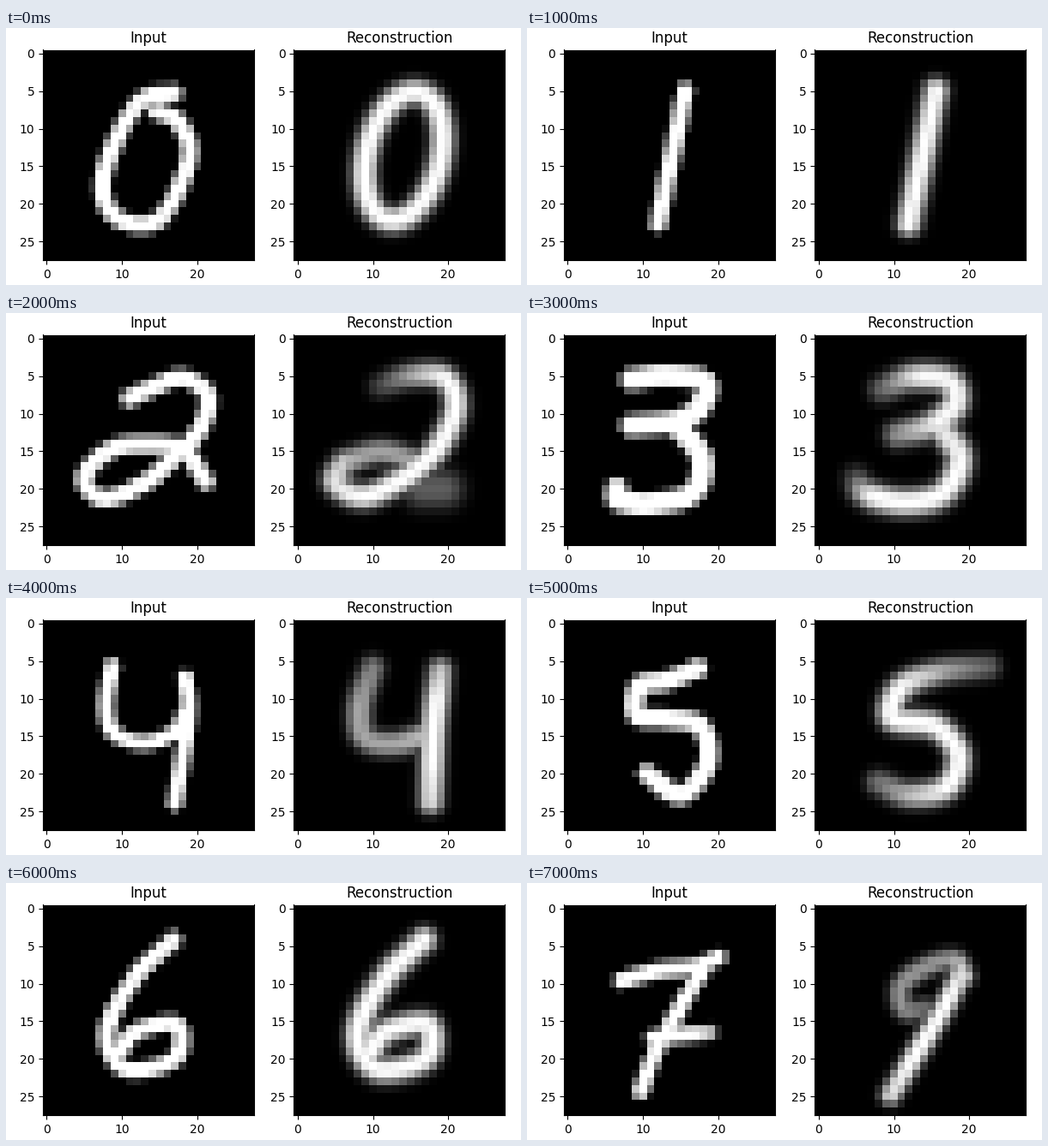
Animation of 600 by 300 pixels, one loop 8 s. Source, as a matplotlib script:

```python
import numpy as np
import matplotlib.pyplot as plt
from matplotlib.animation import FuncAnimation

SIZE = 28
GX, GY = np.meshgrid(np.arange(SIZE), np.arange(SIZE))


def stroke(*points, fade=(1, 1, 1)):
    """Catmull-Rom curve; fade is the brightness at start, middle and end."""
    p = np.array(points, float)
    p = np.vstack([2 * p[0] - p[1], p, 2 * p[-1] - p[-2]])
    t = np.linspace(0, 1, 24)[:, None]
    xy = np.vstack([
        b + 0.5 * t * (c - a + t * (2 * a - 5 * b + 4 * c - d
                                    + t * (3 * (b - c) + d - a)))
        for a, b, c, d in zip(p, p[1:], p[2:], p[3:])])
    start, middle, end = fade
    u = np.linspace(0, 1, len(xy))
    glow = np.interp(u, [0, 0.25, 0.75, 1], [start, middle, middle, end])
    return np.column_stack([xy, glow])


def oval(cx, cy, rx, ry, lean):
    """Closed ellipse slanted to the right."""
    a = np.linspace(0, 2 * np.pi, 120)
    x = cx + rx * np.cos(a) - lean * ry * np.sin(a)
    y = cy + ry * np.sin(a)
    return np.column_stack([x, y, np.ones_like(a)])


def paint(strokes, profile):
    s = np.vstack(strokes)
    dist = np.hypot(GX[..., None] - s[:, 0], GY[..., None] - s[:, 1])
    return (s[:, 2] * profile(dist)).max(axis=-1)


def pen(*strokes, r=1.1):
    """Crisp handwriting with a nearly hard edge."""
    return paint(strokes, lambda d: np.clip(r + 0.5 - d, 0, 1))


def blur(*strokes, w=1.7, p=2.5):
    """Soft strokes, as a decoder returns them."""
    return paint(strokes, lambda d: np.exp(-(d / w) ** p))


def zero():
    ring = stroke((16.9, 5.3), (13, 6), (9.7, 10.5), (7.4, 17.5), (9.5, 22),
                  (15, 22), (18.9, 14), (17.5, 9.2), (14.6, 7.7))
    return pen(ring), blur(oval(14.1, 13.7, 5, 8.5, 0.17))


def one():
    bar = stroke((15.6, 5), (12, 22.6))
    return pen(bar), blur(bar)


def two():
    ink = stroke((11, 8), (14, 6.6), (18, 5.3), (21.4, 7.7), (20.2, 12.3),
                 (16.8, 16), (12.7, 19.4), (7.5, 21.3), (5, 18.5),
                 (8.5, 14.8), (13, 14.1), (18, 14.8), (21.1, 19))
    body = stroke((11, 6.4), (15, 5), (19.5, 5.3), (21, 9), (19, 14),
                  (15, 18), (9, 21), (5, 19.2), (6.2, 16.5),
                  fade=(0.25, 0.95, 0.75))
    bridge = stroke((6.2, 16.5), (11, 15.1), (15.5, 16.3),
                    fade=(0.7, 0.6, 0.6))
    haze = stroke((16.5, 20), (19.5, 20), fade=(0.35, 0.35, 0.35))
    return pen(ink, r=1.15), np.maximum(blur(body, bridge), blur(haze, w=2.6))


def three():
    top = stroke((8.5, 5.5), (13, 5), (18.2, 5.8), (17.6, 9), (14.5, 11),
                 (8.5, 11.6))
    bowl = stroke((14.8, 12), (17.8, 16), (16.5, 20.6), (11, 22),
                  (6.8, 21.5), (6.5, 20))
    soft_top = stroke((8.5, 6.8), (12.5, 5.2), (17.3, 5.7), (18.2, 8.7),
                      (15, 11.5), (10.5, 12.8), fade=(0.35, 0.88, 0.5))
    soft_bowl = stroke((16.3, 12), (18.8, 16), (16.5, 20.6), (11.5, 21.8),
                       (6.5, 20.7), (5, 18.7), fade=(0.8, 0.9, 0.25))
    return pen(top, bowl, r=1.45), blur(soft_top, soft_bowl, w=1.85)


def four():
    bowl = stroke((8.7, 5.7), (7.9, 11), (9, 14.6), (13, 15.9), (17, 14.4),
                  (18.6, 11.5))
    stem = stroke((18.4, 7.3), (18.8, 12.5), (17, 23.9))
    soft_bowl = stroke((10, 6), (8.3, 11), (9, 15.2), (13, 16), (17.5, 14.7),
                       fade=(0.5, 0.65, 0.75))
    soft_stem = stroke((19, 6.3), (18.1, 14), (17.7, 23.7),
                       fade=(0.75, 1, 0.85))
    return pen(bowl, stem, r=1), blur(soft_bowl, soft_stem)


def five():
    ink = stroke((17.3, 6), (13, 7.7), (9.5, 8.4), (9.2, 12.2), (13, 12.7),
                 (17.6, 13.7), (18.6, 18.5), (15, 22.8), (10.5, 20))
    soft = stroke((22.5, 5.8), (16, 6.5), (11, 8.6), (9.8, 12.6),
                  (15.5, 13.7), (18.6, 17.5), (17, 21.8), (12, 22.8),
                  (8, 21.2), fade=(0.35, 0.92, 0.4))
    return pen(ink, r=1.25), blur(soft, w=1.75)


def six():
    curl = stroke((16.8, 4.2), (11.5, 9.5), (8, 16.5), (10.5, 21.4),
                  (17, 20), (17.3, 15.5), (12, 16.3), (9.8, 18.8))
    return pen(curl), blur(curl)


def seven():
    top = stroke((7.2, 9.6), (12, 8.3), (17, 7.8), (20, 6.5))
    stem = stroke((18.3, 7.5), (15, 13), (11.7, 19), (9.7, 24.3))
    dash = stroke((11.3, 17.3), (14.5, 16.9), (18.8, 16.5),
                  fade=(1, 1, 0.7))
    soft_stem = stroke((19, 8.5), (16.8, 13), (13, 19.3), (9.6, 24.8),
                       fade=(0.85, 1, 0.85))
    curl = stroke((14.5, 13.3), (11.5, 13.5), (11, 10.3), (14.5, 7.7),
                  (18, 6.9), (19.3, 9), fade=(0.4, 0.58, 0.85))
    return pen(top, stem, dash, r=1.05), blur(soft_stem, curl, w=1.45)


pairs = [digit() for digit in (zero, one, two, three, four, five, six, seven)]

# Axes boxes in pixels on a 600 by 300 stage
SIDE, BOTTOM = 245.55, 28.95
fig = plt.figure(figsize=(6, 3), dpi=100)
images = []
for left, title in ((42.95, "Input"), (335.45, "Reconstruction")):
    ax = fig.add_axes([left / 600, BOTTOM / 300, SIDE / 600, SIDE / 300])
    images.append(ax.imshow(np.zeros((SIZE, SIZE)), cmap="gray", vmin=0, vmax=1,
                            interpolation="nearest", aspect="auto"))
    ax.set_xticks(range(0, SIZE, 10))
    ax.set_yticks(range(0, SIZE, 5))
    ax.set_title(title)


def update(i):
    for im, data in zip(images, pairs[i]):
        im.set_data(data / data.max())
    return images


anim = FuncAnimation(fig, update, frames=len(pairs), interval=1000,
                     repeat=True, repeat_delay=0)
plt.show()
```
